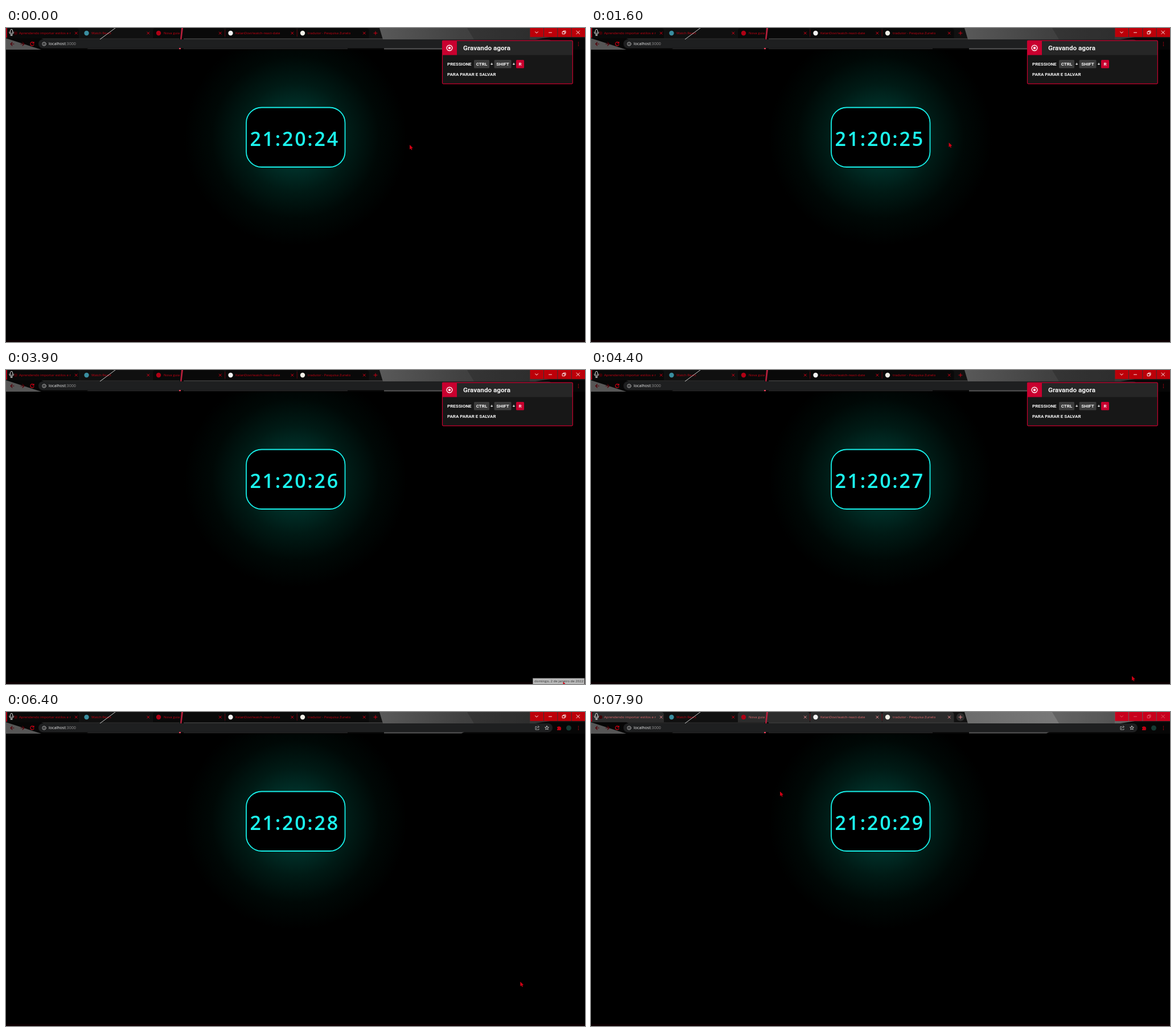
Recreate the animation shown at these times as an HTML page. Size 1017 by 551 pixels, loop 8 s.

```html
<!DOCTYPE html>
<html lang="pt-BR">
<head>
<meta charset="utf-8">
<title>Watch React</title>
<style>
html, body { margin: 0; width: 100%; height: 100%; overflow: hidden; background: #000; }
svg { display: block; width: 100%; height: 100%; }
text { font-family: "Open Sans", "Noto Sans", sans-serif; white-space: pre; }
.tab { font-size: 6.1px; }
.note text { font: 600 8px Roboto, sans-serif; fill: #f4f4f4; }
.line { fill: none; stroke-linecap: round; stroke-linejoin: round; }
</style>
</head>
<body>
<svg viewBox="0 0 1017 551" preserveAspectRatio="none">
  <defs>
    <radialGradient id="glow">
      <stop offset="0" stop-color="#004339"/>
      <stop offset=".3" stop-color="#002e27"/>
      <stop offset=".5" stop-color="#001a15"/>
      <stop offset=".75" stop-color="#000806"/>
      <stop offset="1" stop-color="#000"/>
    </radialGradient>
    <linearGradient id="shard">
      <stop offset="0" stop-color="#595959"/>
      <stop offset=".4" stop-color="#414141"/>
      <stop offset="1" stop-color="#303030"/>
    </linearGradient>
    <linearGradient id="shardLit">
      <stop offset="0" stop-color="#6c6c6c"/>
      <stop offset=".45" stop-color="#787878"/>
      <stop offset="1" stop-color="#555"/>
    </linearGradient>
    <clipPath id="page"><rect y="38" width="1017" height="513"/></clipPath>
    <clipPath id="tabClip"><rect x="20" width="96" height="18"/></clipPath>
  </defs>

  <rect width="1017" height="551"/>
  <ellipse cx="508.5" cy="192" rx="196" ry="190" fill="url(#glow)" clip-path="url(#page)"/>
  <rect y="547.5" width="1017" height="3.5" fill="#0d0002"/>

  <rect width="1017" height="20" fill="#111"/>
  <rect y="18" width="1017" height="20" fill="#060606"/>
  <path d="M0 18L62 38H0Z" fill="#565656"/>
  <path d="M62 18H305V20H66Z" fill="#242424"/>
  <path d="M312 18H662V20H312Z" fill="#343434"/>
  <path id="strip" d="M656 0H1017V16H955L930 20H662Z"/>
  <path d="M810 0H920V20H822Z" opacity=".18"/>
  <path d="M145 35.5H304V37H142ZM312 35.5H600V37H312Z" fill="#282828"/>
  <path d="M664 35H805L800 37.5H664Z" fill="#555"/>
  <g id="tabs"></g>
  <path class="line" d="M192 0L165 20" stroke="#ddd" stroke-width=".9"/>
  <path d="M308 0H311L308.5 20H306Z" fill="#b5203c"/>
  <rect width="2" height="17" fill="#a80012"/>
  <g class="line" stroke="#ddd" stroke-width="1">
    <rect x="7.6" y="2.5" width="4" height="7" rx="2"/>
    <path d="M5.8 7C5.8 13 13.4 13 13.4 7M9.6 11.5V13M7.8 13H11.4"/>
  </g>
  <circle id="plusDisc" cx="649" cy="9" r="7.2"/>
  <path id="plus" class="line" d="M646 9H652M649 6V12" stroke-width="1"/>

  <rect x="57" y="20" width="903" height="15.6" rx="7.8" fill="#1e1f20"/>
  <rect x="304" y="35" width="3" height="2.2" fill="#f0405c"/>
  <g class="line" stroke-width="1.1">
    <path d="M14 28H8M11 25L8 28L11 31M26 28H32M29 25L32 28L29 31" stroke="#520008"/>
    <path d="M48.7 26A3.2 3.2 0 1 0 49 29M49 24.5V26.8H46.6" stroke="#d80014"/>
    <circle cx="67" cy="28" r="3.2" stroke="#ccc" stroke-width=".8"/>
    <path d="M67 27.7V29.6M67 26.2V26.3" stroke="#ccc" stroke-width=".8"/>
    <path d="M932 25.5H930V31H936V29.5M931.8 29C932 26.5 934 26 936 26M934.5 24.3L936.5 26L934.5 27.7" stroke="#bbb" stroke-width=".8"/>
    <path id="star" stroke="#ddd" stroke-width=".8"/>
  </g>
  <text x="75" y="30.2" font-size="7.1" fill="#f2f2f2">localhost<tspan fill="#969696">:3000</tspan></text>
  <path d="M968 26H970A1.4 1.4 0 0 1 972.6 26H974.6V28A1.4 1.4 0 0 1 974.6 30.4V32H968V30A1.3 1.3 0 0 0 968 27.5Z" fill="#c00012"/>
  <circle cx="988.5" cy="28" r="4.5" fill="#153a33"/>
  <path class="line" d="M1005.5 25.2V25.3M1005.5 28V28.1M1005.5 30.8V30.9" stroke="#d00014" stroke-width="1.4"/>

  <g id="controls"></g>
  <g id="icons" class="line" stroke-width=".9">
    <path d="M929.5 6.7L932 9L934.5 6.7M953.5 8H958.5M1002 5L1007.5 10.5M1007.5 5L1002 10.5"/>
    <path d="M977.5 6.5H981.5V10.5H977.5ZM979 6.3V5H983V9H981.7"/>
  </g>

  <rect x="422" y="139.5" width="173.5" height="104.5" rx="27" stroke="#17eee7" stroke-width="1.8"/>
  <text id="clock" x="428.4" y="207" font-size="34" font-weight="600" letter-spacing="2.8" fill="#1cf6ef"></text>

  <g id="note" class="note">
    <rect x="766.5" y="22.2" width="228.8" height="75.6" rx="1.5" fill="#171717"/>
    <rect x="792" y="22.5" width="203" height="25" fill="#262626"/>
    <rect x="766.5" y="22.5" width="25.5" height="25" fill="#c9002f"/>
    <rect x="766.5" y="22.2" width="228.8" height="75.6" rx="1.5" fill="none" stroke="#c9002f" stroke-width="1.2"/>
    <circle cx="779" cy="35" r="4.8" fill="none" stroke="#fff" stroke-width="1.4"/>
    <circle cx="779" cy="35" r="2.2" fill="#fff"/>
    <text x="803" y="39" style="font-size:11.7px">Gravando agora</text>
    <text x="775" y="66">PRESSIONE</text>
    <text x="775" y="84.2">PARA PARAR E SALVAR</text>
    <text x="851" y="66">+</text>
    <text x="889.8" y="66">+</text>
    <g id="keys" text-anchor="middle"></g>
  </g>

  <g id="tip">
    <rect x="925.5" y="541" width="90.5" height="10.5" fill="#b9b9b9" stroke="#777" stroke-width=".7"/>
    <text x="928" y="548.4" font-size="6.1" fill="#333">domingo, 2 de janeiro de 2022</text>
  </g>
  <path id="cursor" d="M0 0V8L2 6.4L3.2 9.2L4.5 8.6L3.4 5.9L5.8 5.6Z" fill="#d00014"/>
</svg>
<script>
const LOOP = 8000, STEP = 100;
const $ = id => document.getElementById(id);

function add(parent, tag, attrs, text) {
  const el = document.createElementNS('http://www.w3.org/2000/svg', tag);
  for (const k in attrs) el.setAttribute(k, attrs[k]);
  if (text) el.textContent = text;
  parent.append(el);
  return el;
}

// left edge, icon x, icon colour, text x, title
const tabs = [
  [2, 17, '#3c0006', 23, 'Aprendendo importar estilos e r'],
  [131, 141.5, '#3a8ea0', 150, 'Watch React'],
  [258, 268, '#b00014', 277, 'Nova guia'],
  [385, 394.5, '#f2f2f2', 403, 'KelanDovi/watch-react-date'],
  [511.5, 521, '#f0eee6', 530, 'tradutor - Pesquisa Zunelo']
].map(([x, iconX, color, textX, title], i) => {
  const g = $('tabs');
  const back = add(g, 'path', { d: `M${x} 18V5Q${x} 0 ${x + 5} 0H${x + 121}Q${x + 126} 0 ${x + 126} 5V18Z` });
  add(g, 'circle', { cx: iconX, cy: 9, r: i ? 4.2 : 3, fill: color });
  const box = add(g, 'g', i ? {} : { 'clip-path': 'url(#tabClip)' });
  const label = add(box, 'text', { class: 'tab', x: textX, y: 11.2 }, title);
  const cx = 123.3 + i * 126.5;
  const close = add(g, 'path', { class: 'line', 'stroke-width': 1, d: `M${cx - 2} 7L${cx + 2} 11M${cx + 2} 7L${cx - 2} 11` });
  if (i > 2) add(g, 'path', { d: `M${x - .3} 3V15`, stroke: '#900010', 'stroke-width': .7 });
  return { back, label, close, active: i === 1 };
});

const buttons = [0, 1, 2, 3].map(i =>
  add($('controls'), 'rect', { x: 920.5 + i * 24.4, y: 0, width: 23.4, height: 15.8 }));

[[822, 27, 'CTRL', '#3d3d3d'], [857.5, 30, 'SHIFT', '#3d3d3d'], [896, 14, 'R', '#c9002f']].forEach(([x, w, key, fill]) => {
  add($('keys'), 'rect', { x, y: 56, width: w, height: 14.5, rx: 1.5, fill });
  add($('keys'), 'text', { x: x + w / 2, y: 66 }, key);
});

$('star').setAttribute('d', 'M' + Array.from({ length: 10 }, (_, i) => {
  const r = i % 2 ? 1.6 : 3.6, a = i * Math.PI / 5;
  return `${950 + r * Math.sin(a)} ${28 - r * Math.cos(a)}`;
}).join('L') + 'Z');

// time, x, y; positions below the stage hide the pointer
const path = [
  [0, 709, 205], [900, 668, 212], [1600, 628.5, 201], [2300, 628.5, 201],
  [2400, 725, 290], [2500, 860, 450], [2600, 930, 560], [3500, 980, 560],
  [3700, 978.5, 547], [4100, 978.5, 547], [4300, 979, 558], [4400, 950, 537],
  [5200, 490, 172], [5400, 481.5, 165], [5700, 560, 115], [6100, 815, 215],
  [6200, 850, 300], [6500, 930, 560], [7300, 640, 560], [7600, 430, 290],
  [7900, 332, 139.5], [8000, 332, 139.5]
];
const ticks = [1500, 2900, 4400, 5900, 7300];

function pointer(t) {
  const i = path.findIndex(p => p[0] > t);
  const [t0, x0, y0] = path[i - 1], [t1, x1, y1] = path[i];
  const k = (t - t0) / (t1 - t0);
  return [x0 + (x1 - x0) * k, y0 + (y1 - y0) * k];
}

const clamp = v => Math.max(0, Math.min(1, v));

function draw(t) {
  const [x, y] = pointer(t);
  $('cursor').setAttribute('transform', `translate(${x} ${y})`);
  $('clock').textContent = '21:20:' + (24 + ticks.filter(s => t >= s).length);
  $('note').style.display = t < 6300 ? '' : 'none';
  $('tip').style.opacity = clamp(Math.min((t - 3400) / 300, (4300 - t) / 200));

  const blurred = t >= 7600;
  $('strip').setAttribute('fill', `url(#${blurred ? 'shardLit' : 'shard'})`);
  for (const { back, label, close, active } of tabs) {
    const lit = blurred && !active;
    back.setAttribute('fill', lit ? '#2c2c2c' : active ? '#101010' : '#090909');
    label.setAttribute('fill', lit ? '#e0686c' : '#c80012');
    close.setAttribute('stroke', lit ? '#e88a8e' : '#d00014');
  }
  $('plusDisc').setAttribute('fill', blurred ? '#2c2c2c' : '#111');
  $('plus').setAttribute('stroke', blurred ? '#e88a8e' : '#d00014');
  buttons.forEach(b => b.setAttribute('fill', blurred ? '#c8001c' : '#bd0009'));
  $('icons').setAttribute('stroke', blurred ? '#e0606e' : '#fff');
}

const start = performance.now();
function frame() {
  const t = (performance.now() - start) % LOOP;
  draw(Math.floor(t / STEP) * STEP);
  requestAnimationFrame(frame);
}
frame();
</script>
</body>
</html>
```
